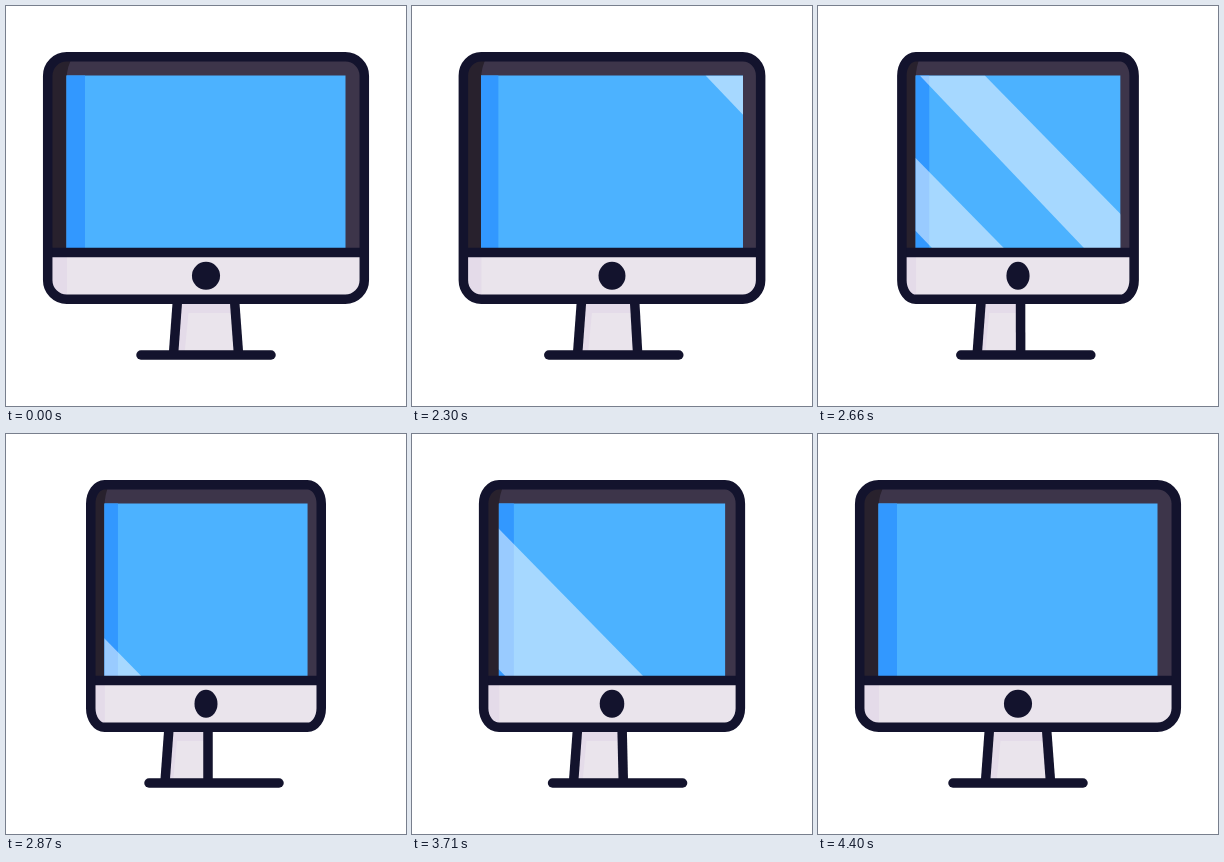
Recreate the animation shown at these times as an HTML page with a canvas. Size 400 px wide and 400 px high, loop 4430 ms.

```html
<!DOCTYPE html>
<html lang="en">
<head>
<meta charset="utf-8">
<title>Turning monitor</title>
<style>
  html, body { margin: 0; width: 100%; height: 100%; overflow: hidden; background: #fff; }
  canvas { display: block; width: 400px; height: 400px; }
</style>
</head>
<body>
<canvas id="stage" width="400" height="400"></canvas>
<script>
const ctx = document.getElementById('stage').getContext('2d');
const LOOP = 4430;
const CENTER = 200;
const SCREEN = { half: 139.5, top: 69.5, bottom: 243 };
const COLOR = {
  ink: '#13132d', bezel: '#3d354a', bezelShade: '#28212d',
  screen: '#4cb2ff', screenShade: '#3298ff', glint: 'rgba(255,255,255,.5)',
  shell: '#eae4ec', shellShade: '#e4dbe9'
};

const lerp = (a, b, p) => a + (b - a) * p;

function easeInOut(p) {
  p = Math.min(1, Math.max(0, p));
  return p < 0.5 ? 4 * p ** 3 : 1 - 4 * (1 - p) ** 3;
}

// 0 facing front, 1 fully turned
function turnAt(t) {
  return t < 3000 ? easeInOut((t - 1990) / 810) : 1 - easeInOut((t - 3180) / 1250);
}

function polygon(points, color) {
  ctx.beginPath();
  points.forEach(([x, y]) => ctx.lineTo(x, y));
  ctx.closePath();
  ctx.fillStyle = color;
  ctx.fill();
}

function line(x1, y1, x2, y2, cap = 'butt') {
  ctx.beginPath();
  ctx.moveTo(x1, y1);
  ctx.lineTo(x2, y2);
  ctx.lineCap = cap;
  ctx.stroke();
}

function box(left, top, right, bottom, color) {
  ctx.fillStyle = color;
  ctx.fillRect(left, top, right - left, bottom - top);
}

function drawStand(turn) {
  const leftTop = lerp(171.5, 163, turn), leftFoot = lerp(167.5, 159, turn);
  const rightTop = lerp(228.5, 202, turn), rightFoot = lerp(232.5, 202, turn);
  const inset = lerp(11, 8, turn);

  polygon([[leftTop, 294], [rightTop, 294], [rightFoot, 348], [leftFoot, 348]], COLOR.shell);
  polygon([[leftTop, 294], [rightTop, 294], [rightTop, 307], [leftTop + inset, 307],
           [leftFoot + inset, 348], [leftFoot, 348]], COLOR.shellShade);
  line(leftTop, 294, leftFoot, 348);
  line(rightTop, 294, rightFoot, 348);

  const shift = 8 * turn;
  line(135 + shift, 349, 265 + shift, 349, 'round');
}

// Left and right are the edge positions at the top of the screen
function drawGlint(left, right) {
  const height = SCREEN.bottom - SCREEN.top;
  polygon([[left, SCREEN.top], [right, SCREEN.top],
           [right + height * 0.98, SCREEN.bottom],
           [left + height * 0.952, SCREEN.bottom]], COLOR.glint);
}

function drawGlints(t) {
  if (t > 2030 && t < 3000) {
    const x = 93 - 0.955 * (t - 2510);
    drawGlint(x, x + 67);
    drawGlint(x + 152, x + 217);
  } else if (t > 3400 && t < 4400) {
    const since = t - 3710;
    drawGlint(-71 + 0.813 * since, 62 + 0.77 * since);
  }
}

function bodyPath(k) {
  ctx.save();
  ctx.translate(CENTER, 0);
  ctx.scale(k, 1);
  ctx.beginPath();
  ctx.roundRect(-158.3, 50.75, 316.6, 242.5, 19);
  ctx.restore();
}

function drawBody(t, k) {
  const at = x => CENTER + x * k;

  ctx.save();
  bodyPath(k);
  ctx.clip();
  box(0, 46, 400, 247, COLOR.bezel);
  ctx.beginPath();
  ctx.moveTo(at(-160), 46);
  ctx.lineTo(at(-130), 46);
  ctx.quadraticCurveTo(at(-139.5), 58, at(-139.5), 74);
  ctx.lineTo(at(-139.5), 247);
  ctx.lineTo(at(-160), 247);
  ctx.fillStyle = COLOR.bezelShade;
  ctx.fill();
  box(0, 247, 400, 298, COLOR.shell);
  box(0, 247, at(-139), 298, COLOR.shellShade);

  ctx.beginPath();
  ctx.rect(at(-SCREEN.half), SCREEN.top, 2 * SCREEN.half * k, SCREEN.bottom - SCREEN.top);
  ctx.clip();
  box(0, 60, 400, 250, COLOR.screen);
  box(0, 60, at(-121), 250, COLOR.screenShade);
  drawGlints(t);
  ctx.restore();

  line(at(-156), 246.5, at(156), 246.5);
  bodyPath(k);
  ctx.stroke();

  ctx.beginPath();
  ctx.ellipse(CENTER, 269.8, 9.3 * k + 4.75, 14, 0, 0, Math.PI * 2);
  ctx.fillStyle = COLOR.ink;
  ctx.fill();
}

function draw(t) {
  const turn = turnAt(t);
  box(0, 0, 400, 400, '#fff');
  ctx.strokeStyle = COLOR.ink;
  ctx.lineWidth = 9.5;
  drawStand(turn);
  drawBody(t, 1 - 0.272 * turn);
}

let start;
function tick(now) {
  start ??= now;
  draw((now - start) % LOOP);
  requestAnimationFrame(tick);
}
draw(0);
requestAnimationFrame(tick);
</script>
</body>
</html>
```
